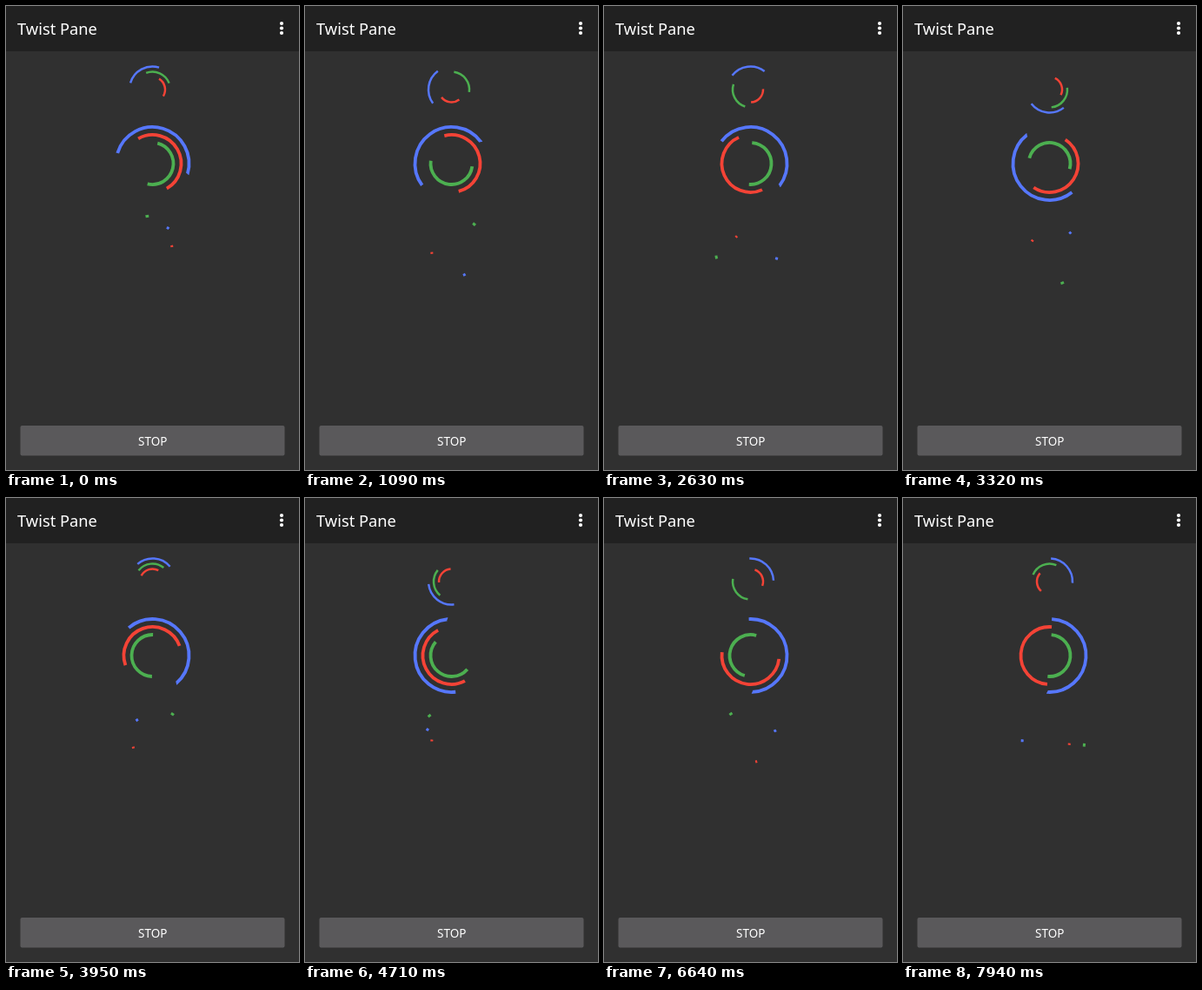
These frames come from a looping animation (337x533 px, 8 s). An HTML page:

```html
<!DOCTYPE html>
<html lang="en">
<head>
<meta charset="utf-8">
<title>Spinning arcs</title>
<style>
  html, body { margin: 0; width: 100%; height: 100%; overflow: hidden; background: #303030; }
  svg { display: block; width: 337px; height: 533px; }
  text { fill: #fff; font-family: "Noto Sans", Roboto, sans-serif; }
  .arc { fill: none; }
</style>
</head>
<body>
<svg id="stage" viewBox="0 0 337 533">
  <rect width="337" height="533" fill="#303030"/>
  <rect width="337" height="52" fill="#212121"/>
  <text x="13" y="33" font-size="18.3">Twist Pane</text>
  <g fill="#fff">
    <circle cx="317" cy="20" r="2.1"/>
    <circle cx="317" cy="25.5" r="2.1"/>
    <circle cx="317" cy="31" r="2.1"/>
  </g>
  <rect x="16.5" y="482" width="304" height="34.5" rx="2" fill="#5a595b"/>
  <text x="168.8" y="505" font-size="13.5" text-anchor="middle">STOP</text>
</svg>
<script>
const LOOP = 8000;
const BLUE = '#5677fc', RED = '#f44336', GREEN = '#4caf50';

// The spinners are already turning when the loop starts, and run slightly fast.
const HEAD_START = 0.727, RATE = 1.0435;

// Speed is in degrees per second; each inner ring turns faster by the parallax.
const spinners = [
  { y: 96, radius: 26.5, gap: 6, width: 2.5, sweep: 90, speed: 270, parallax: 72, delay: 0, colors: [BLUE, GREEN, RED] },
  { y: 181, radius: 42, gap: 9, width: 3.8, sweep: 180, speed: 270, parallax: 60, delay: 0, colors: [BLUE, RED, GREEN] },
  { y: 281, radius: 40, gap: 8.6, width: 3, sweep: 5.5, speed: 360, parallax: 60, delay: 0.01, colors: [GREEN, BLUE, RED] }
];

const stage = document.getElementById('stage');

function makeArc(spinner, color, ring) {
  const el = document.createElementNS(stage.namespaceURI, 'circle');
  const attributes = {
    class: 'arc', r: spinner.radius - ring * spinner.gap,
    stroke: color, 'stroke-width': spinner.width,
    pathLength: 360, 'stroke-dasharray': `${spinner.sweep} ${360 - spinner.sweep}`
  };
  for (const name in attributes) el.setAttribute(name, attributes[name]);
  stage.append(el);
  return { el, y: spinner.y, delay: spinner.delay, speed: spinner.speed + ring * spinner.parallax };
}

const arcs = spinners.flatMap(s => s.colors.map((color, ring) => makeArc(s, color, ring)));

function render() {
  const seconds = performance.now() % LOOP / 1000;
  const clock = HEAD_START + RATE * seconds;
  for (const { el, y, delay, speed } of arcs) {
    const angle = speed * (clock - delay) % 360;
    el.setAttribute('transform', `translate(168.5 ${y}) rotate(${angle})`);
  }
  requestAnimationFrame(render);
}
render();
</script>
</body>
</html>
```
